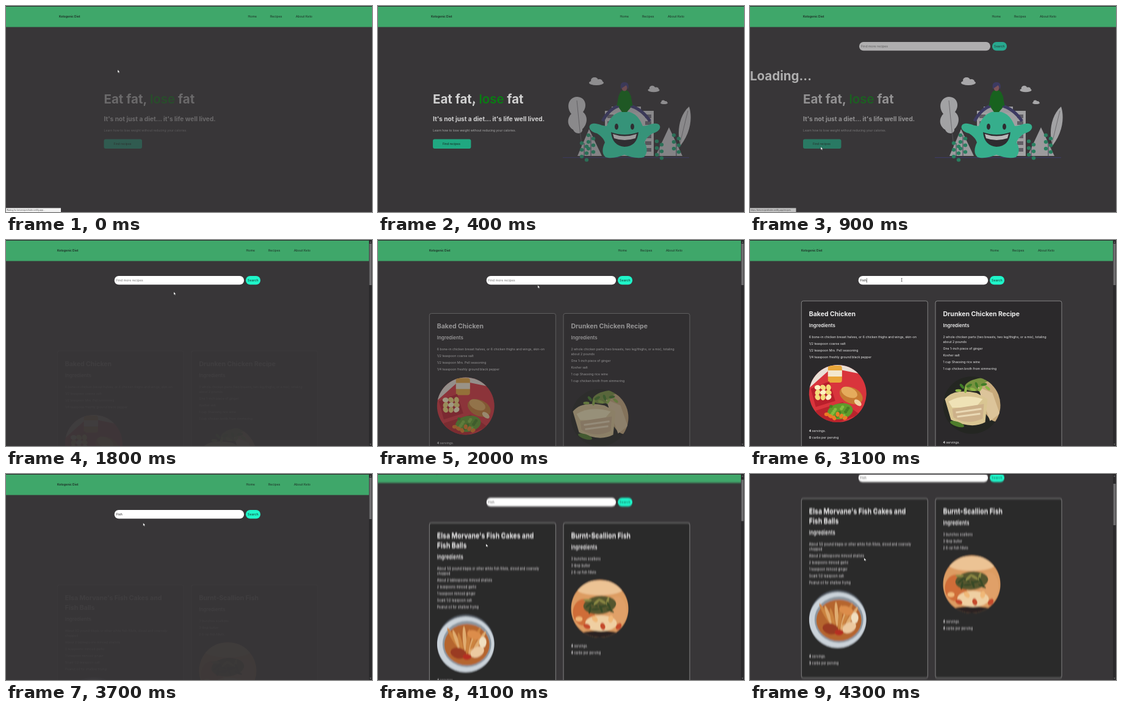
These frames come from a looping animation (600x338 px, 4.4 s). An HTML page:

```html
<!DOCTYPE html>
<html lang="en">
<head>
<meta charset="utf-8">
<title>Ketogenic Diet</title>
<style>
  html, body { margin: 0; width: 100%; height: 100%; overflow: hidden; background: #383638; }
  svg { display: block; width: 100vw; height: 100vh; }
  text { font-family: Inter, "Open Sans", sans-serif; white-space: pre; }
</style>
</head>
<body>
<svg id="stage" viewBox="0 0 600 338"></svg>
<script>
const LOOP = 4400, STEP = 100;
const WHITE = '#ececec', TEAL = '#1ff5c9', INK = '#1d2b24';

// ---- markup helpers; text is placed by its vertical centre ----
const text = (x, y, size, str, fill = WHITE, weight = 400, id = '') =>
  `<text id="${id}" x="${x}" y="${y + size * .35}" font-size="${size}" font-weight="${weight}" fill="${fill}">${str}</text>`;
const rect = (x, y, w, h, fill, r = 0, extra = '') =>
  `<rect x="${x}" y="${y}" width="${w}" height="${h}" rx="${r}" fill="${fill}" ${extra}/>`;
const oval = (x, y, rx, ry, fill, turn = 0) =>
  `<ellipse cx="${x}" cy="${y}" rx="${rx}" ry="${ry}" fill="${fill}" transform="rotate(${turn} ${x} ${y})"/>`;
const path = (d, fill, extra = '') => `<path d="${d}" fill="${fill}" ${extra}/>`;
const group = (id, body, extra = '') => `<g id="${id}" ${extra}>${body}</g>`;
const times = (n, fn) => Array.from({ length: n }, (_, i) => fn(i)).join('');

// ---- food pictures, drawn around 0,0 inside a round clip ----
const photos = {
  tray: rect(-48, -48, 96, 96, '#d9343c') +
    path('M-48-48H48V-30L-10-42L-48-8Z', '#e9dfd6') +
    rect(-16, -46, 23, 28, '#e9a63a', 4) + rect(-16, -38, 23, 10, '#f3e7cf') +
    path('M-44-8L-14-20L-4 12L-36 22Z', '#b91f2b') +
    times(9, i => oval(-33 + i % 3 * 9, -10 + (i / 3 | 0) * 8, 5, 4, i % 4 ? '#f4dc7a' : '#fff2c4', i * 40)) +
    oval(22, 3, 20, 13, '#c77a32', 25) + oval(19, -2, 14, 8, '#e5ab5c', 25) + oval(33, 15, 7, 4, '#f0d3a0', 40) +
    path('M-36 28L8 14L36 34L0 48H-30Z', '#b9232c') +
    oval(4, 29, 21, 13, '#5f9a2b', -10) +
    times(14, i => oval(-11 + i * 7 % 30, 21 + i * 5 % 17, 2.6, 2.4, i % 2 ? '#83bb3e' : '#477f22')) +
    times(6, i => oval(-18 + i * 6, 34 + i % 3 * 3, 4, 3, '#ec7b25', i * 30)),
  meat: rect(-48, -48, 96, 96, '#242622') +
    oval(12, -34, 24, 10, '#78923f', -12) + oval(34, -6, 18, 34, '#c8aa7c', -15) +
    path('M10-30L34-20L46 14L30 26Z', '#dcc49a') +
    path('M-44-10Q-30-28 8-20L26-10L22 28Q0 40-34 24Z', '#d9c592') +
    path('M-38-6Q-14-20 18-10L6 4L-32 4Z', '#efe2b6') +
    path('M-32 6L20-2L18 22Q-8 34-30 20Z', '#cdb18a') +
    path('M-26 12L16 6M-24 19L14 14', 'none', 'stroke="#ead9b5" stroke-width="3"') +
    times(9, i => oval(-22 + i * 6, -24 - i * 7 % 13, 5, 2.2, i % 2 ? '#427d28' : '#8eb747', i * 50)) +
    oval(-24, 31, 12, 4, '#4e7c2b', 18),
  bowl: rect(-48, -48, 96, 96, '#59616a') + oval(0, 2, 47, 46, '#cbd3da') +
    oval(2, 1, 40, 38, '#8c969f') + oval(2, 2, 37, 34, '#b5652d') +
    times(8, i => oval(-20 + i * 6, -8 + i % 3 * 5, 3, 20, i % 2 ? '#e0ac70' : '#cc843f', i * 9 - 30)) +
    oval(-12, 16, 13, 9, '#9a3b20', 15) + oval(19, 14, 12, 8, '#ecc9a0', -30) + oval(14, -14, 12, 7, '#dc8d4b', 20) +
    oval(2, 22, 7, 5, '#b62f22') + oval(28, -2, 6, 9, '#f0dfc0'),
  fish: rect(-48, -48, 96, 96, '#dd9c62') + oval(0, -34, 40, 12, '#ecc394') + oval(0, 46, 42, 10, '#2c2422') +
    oval(-26, 6, 18, 22, '#cf6d38') + oval(28, 4, 16, 24, '#e0a068') + oval(2, 24, 26, 13, '#efcfa2') +
    oval(0, -6, 27, 15, '#56562f', -6) +
    times(12, i => oval(-20 + i * 11 % 42, -14 + i * 7 % 20, 7, 2, i % 3 ? '#394a28' : '#8d8a45', i * 35)) +
    times(6, i => oval(-34 + i * 13, 17 + i % 2 * 12, 6, 4, i % 2 ? '#c54a2c' : '#f0b878', i * 25))
};

// ---- a recipe card; "+" marks the rest of a wrapped line ----
function card(x, height, title, items, photo, carbs) {
  const left = x + 12.5;
  let y = 121, out = rect(x, 100, 207, height, '#2b292b', 3, 'stroke="#a9a9a9" stroke-width=".7"');
  title.forEach((line, i) => out += text(left, y += i * 16, 10.5, line, WHITE, 700));
  out += text(left, y += 19, 7.9, 'Ingredients', WHITE, 600);
  y += 8;
  for (const item of items) {
    const wrapped = item[0] === '+';
    out += text(left, y += wrapped ? 8 : 11, 5.2, wrapped ? item.slice(1) : item);
  }
  out += `<g transform="translate(${x + 59.5} ${y += 60})"><g clip-path="url(#round)">${photos[photo]}</g></g>`;
  const bold = n => `<tspan font-weight="700">${n}</tspan>`;
  return out + text(left, y += 61, 5.2, bold(4) + ' servings.') +
    text(left, y + 10.7, 5.2, bold(carbs) + ' carbs per perving');
}

const chicken = card(84.3, 270, ['Baked Chicken'], [
  '6 bone-in chicken breast halves, or 6 chicken thighs and wings, skin-on',
  '1/2 teaspoon coarse salt', '1/2 teaspoon Mrs. Pell seasoning',
  '1/4 teaspoon freshly ground black pepper'], 'tray', 0) +
  card(304, 270, ['Drunken Chicken Recipe'], [
  '2 whole chicken parts (two breasts, two leg/thighs, or a mix), totaling', '+about 2 pounds',
  'One 1-inch piece of ginger', 'Kosher salt', '1 cup Shaoxing rice wine',
  '1 cup chicken broth from simmering'], 'meat', 2);

const seafood = card(84.3, 295, ["Elsa Morvane's Fish Cakes and", 'Fish Balls'], [
  'About 1/2 pound tilapia or other white fish fillets, sliced and coarsely', '+chopped',
  'About 2 tablespoons minced shallots', '2 teaspoons minced garlic', '1 teaspoon minced ginger',
  'Scant 1/2 teaspoon salt', 'Peanut oil for shallow frying'], 'bowl', 3) +
  card(304, 295, ['Burnt-Scallion Fish'],
  ['3 bunches scallions', '3 tbsp butter', '2 6-oz fish fillets'], 'fish', 4);

// ---- home page illustration ----
const cloud = (x, y, s) => oval(x, y, 12 * s, 4 * s, '#e4e4e6') +
  oval(x - 3 * s, y - 4 * s, 6 * s, 5 * s, '#e4e4e6') + oval(x + 5 * s, y - 2 * s, 5 * s, 4 * s, '#e4e4e6');
const berries = (x, y) => path(`M${x} 248V${y}`, 'none', 'stroke="#3f3d56"') +
  times(6, i => oval(x + (i % 2 ? 4 : -4), y + i * 5.5, 3.2, 3, '#20a876'));
const leaf = (d, stem) => path(d, '#dcdcde') + path(stem, 'none', 'stroke="#77757a" stroke-width=".8"');
const picture = cloud(358, 126, 1) + cloud(452, 138, .8) + cloud(469, 159, .5) +
  leaf('M326 149C340 149 344 164 336 174C346 182 342 196 335 202C336 210 324 212 320 203C309 196 310 184 317 177C308 166 312 150 326 149Z', 'M326 155Q330 200 336 246') +
  leaf('M510 165C516 184 512 208 496 229C490 211 492 181 510 165Z', 'M508 172Q500 205 490 246') +
  path('M346 202L367 246H327Z', '#d0d0d3') + path('M477 199L499 246H455Z', '#d0d0d3') +
  rect(372, 172, 80, 74, '#d9d9dc') + rect(383, 165, 48, 10, '#cfcfd3') +
  times(12, i => rect(376 + i % 2 * 62, 178 + (i / 2 | 0) * 11, 10, 6, '#77757f')) +
  rect(303, 248, 207, 1.3, '#3f3d78') +
  berries(349, 212) + berries(461, 222) + berries(489, 212) + berries(338, 225) +
  path('M404 173C421 173 429 184 434 197C444 197 451 190 460 194C466 199 460 207 450 209C444 213 439 217 437 224C442 232 442 242 436 248C426 251 414 248 404 244C394 248 382 251 373 248C366 242 368 232 372 224C370 217 365 213 359 209C349 207 343 199 349 194C358 190 365 197 375 197C380 184 388 173 404 173Z', '#35efb9') +
  oval(391, 198, 3, 5, '#29272d') + oval(417, 198, 3, 5, '#29272d') +
  path('M382 207Q404 215 427 207Q425 230 404 231Q384 229 382 207Z', '#29272d') +
  path('M385 210Q404 217 424 210L422 217Q404 223 387 217Z', '#fff') +
  path('M397 163Q379 168 368 189M411 163Q432 168 446 189', 'none', 'stroke="#3f3d78" stroke-width="5"') +
  path('M395 167V147Q397 138 404 138Q412 138 414 147V167L408 174H400Z', '#087a12') +
  path('M396 147L393 164M413 147L416 164', 'none', 'stroke="#087a12" stroke-width="3"') +
  oval(404, 134, 4.5, 5.5, '#a2616a') + path('M398 136Q396 125 404 125Q413 125 410 137L407 130Z', '#3f3d78');

const hero = text(87, 153, 20.5, 'Eat fat,', WHITE, 700) + text(162.5, 153, 20.5, 'lose', '#008a0c', 600) +
  text(208.5, 153, 20.5, 'fat', WHITE, 700) +
  text(87, 185, 10.2, "It's not just a diet... it's life well lived.", WHITE, 700) +
  text(87, 204, 5.1, 'Learn how to lose weight without reducing your calories.', '#bdbdbd') +
  rect(87, 218.5, 62.5, 15.5, '#1cbc8e', 3) + text(103, 226, 5, 'Find recipes', '#101c18');

const stage = document.getElementById('stage');
stage.innerHTML = `<defs>
  <clipPath id="round"><circle r="47"/></clipPath>
  <filter id="smear" filterUnits="userSpaceOnUse" x="-10" y="-20" width="620" height="460"><feGaussianBlur stdDeviation="0 1.4"/></filter>
  </defs>` + rect(0, 0, 600, 338, '#383638') +
  group('page',
    rect(0, -30, 600, 64.5, '#3fa76a') +
    group('nav', text(87, 17, 4.9, 'Ketogenic Diet', INK, 600) + text(396.5, 17, 5.2, 'Home', INK) +
      text(433, 17, 5.2, 'Recipes', INK) + text(475, 17, 5.2, 'About Keto', INK)) +
    group('home', group('hero', hero) + group('picture', picture)) +
    group('search', rect(179, 59, 215, 14.2, '#fff', 7, 'id="box"') +
      text(182, 66.2, 5.2, '', '#222', 400, 'query') + rect(0, 62.5, .6, 7.5, '#222', 0, 'id="caret"') +
      group('go', rect(397, 59, 24, 14.2, TEAL, 7) + text(400, 66.2, 5.3, 'Search', '#15302a'))) +
    text(0, 115, 20.5, 'Loading...', WHITE, 700, 'loading') +
    group('chicken', chicken) + group('seafood', seafood)) +
  rect(0, 0, 600, 1, '#29282a') +
  group('bar', rect(595, 1, 5, 337, '#2b2a2c') + rect(595.6, 6, 3.8, 68, '#706f71', 0, 'id="thumb"') +
    path('M596.3 4.3L597.5 2.6L598.7 4.3ZM596.3 334.5L597.5 336.2L598.7 334.5Z', '#8a8a8a')) +
  group('status', rect(0, 331.5, 90, 6.5, '#f1f1f1', 0, 'id="tip"') + text(1, 335, 3.2, '', '#444', 400, 'link')) +
  group('cursor', path('M0 0V5L1.2 4L2 5.8L2.9 5.4L2.1 3.7H3.6Z', '#fff', 'id="arrow" stroke="#222" stroke-width=".35"') +
    path('M-1 0H1M0 0V5M-1 5H1', 'none', 'id="beam" stroke="#222" stroke-width=".6"'));

// ---- motion ----
const $ = id => document.getElementById(id);
const set = (id, name, value) => $(id).setAttribute(name, value);
const fade = (id, a) => set(id, 'opacity', Math.max(0, Math.min(1, +a)));
const move = (id, x, y = 0) => set(id, 'transform', `translate(${x} ${y})`);
const part = (t, from, span) => Math.max(0, Math.min(1, (t - from) / span));

// linear value through [time, value] points
function track(t, keys) {
  let v = keys[0][1];
  for (let i = 1; i < keys.length; i++)
    v += (keys[i][1] - keys[i - 1][1]) * part(t, keys[i - 1][0], keys[i][0] - keys[i - 1][0]);
  return v;
}

function rise(id, t, from, span, end) {
  const p = part(t, from, span);
  move(id, 0, 82 * (1 - p) ** 2);
  fade(id, t < from || t >= end ? 0 : .04 + .96 * p);
}

const cursorX = [[0, 183], [200, 183], [700, 116], [1100, 116], [1800, 275], [2200, 248.7], [3500, 248.7], [4100, 177], [4300, 187]];
const cursorY = [[0, 104.5], [200, 104.5], [700, 231], [1100, 231], [1800, 85], [2200, 63], [3500, 63], [4100, 114.5], [4300, 137.5]];

function draw(t) {
  const slide = part(t, 0, 500), leave = track(t, [[800, 1], [900, .5], [1000, 0]]);
  move('hero', 73.5 * (1 - slide) ** 2);
  fade('hero', (.28 + .72 * slide) * leave);
  fade('picture', part(t, 200, 400) * Math.min(1, leave * 1.3));
  fade('search', track(t, [[800, 0], [900, .6], [1000, 1]]));
  fade('loading', t >= 3500 ? t < 3700 : track(t, [[800, 0], [900, .66], [1000, 1]]) * (t < 1600));

  // the scrollbar narrows the page
  const narrow = t >= 1700;
  fade('bar', narrow);
  move('nav', narrow ? -3 : 0);
  move('search', narrow ? -1.3 : 0);
  set('box', 'width', narrow ? 212.5 : 215);
  move('go', narrow ? -2.6 : 0);

  rise('chicken', t, 1800, 400, 3500);
  rise('seafood', t, 3700, 300, LOOP);

  const typed = 'Fish'.slice(0, Math.max(0, Math.floor((t - 2500) / 100)));
  const query = $('query');
  query.textContent = typed || 'Find more recipes';
  query.setAttribute('fill', typed ? '#222' : '#757575');
  set('caret', 'x', 182 + (typed ? query.getComputedTextLength() + .3 : -.4));
  fade('caret', t >= 2300 && t < 3300);

  const scroll = track(t, [[4000, 0], [4300, 60]]);
  move('page', 0, -scroll);
  if (scroll) set('page', 'filter', 'url(#smear)'); else $('page').removeAttribute('filter');
  set('thumb', 'y', 6 + scroll / 6);

  const waiting = t < 400;
  $('link').textContent = waiting ? 'Waiting for ketorecipesfinder.netlify.app...' : 'https://ketorecipesfinder.netlify.app/recipes';
  set('tip', 'width', waiting ? 90 : 75.5);
  fade('status', waiting ? 1 : t >= 700 && t < 1200 ? .75 : 0);

  const typing = t >= 2100 && t < 3600;
  move('cursor', track(t, cursorX), track(t, cursorY));
  fade('arrow', !typing);
  fade('beam', typing);
}

function tick() {
  draw(Math.floor(performance.now() % LOOP / STEP) * STEP);
  requestAnimationFrame(tick);
}
tick();
</script>
</body>
</html>
```
